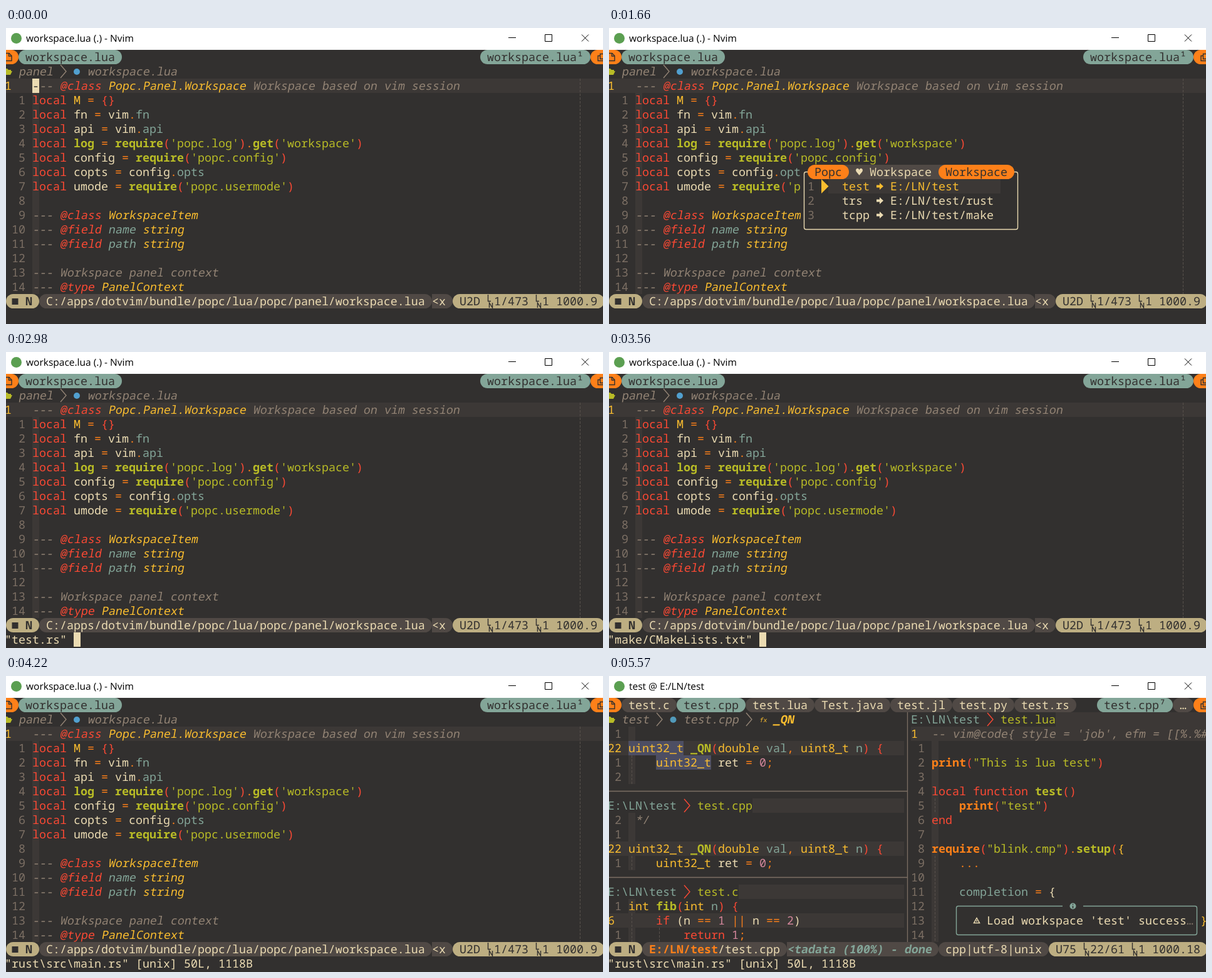
Recreate the animation shown at these times as an HTML page. Size 953 by 474 pixels, loop 5.8 s.

```html
<!DOCTYPE html>
<html lang="en">
<head>
<meta charset="utf-8">
<title>Editor session</title>
<style>
html, body { margin: 0; width: 100%; height: 100%; overflow: hidden; background: #32302f; }
svg { display: block; width: 953px; height: 474px; }
text { font: 18.333px "Noto Sans Mono", "DejaVu Sans Mono", monospace; white-space: pre; text-rendering: geometricPrecision; }
.title { font: 15.5px "Open Sans", "Noto Sans", sans-serif; fill: #000; }
.f { fill: #ebdbb2; }
.d, .D { fill: #32302f; }
.n { fill: #7c6f64; }
.r, .R { fill: #fb4934; }
.o, .O { fill: #fe8019; }
.y, .Y, .Q { fill: #fabd2f; }
.g, .G { fill: #b8bb26; }
.b, .B, .P { fill: #83a598; }
.p { fill: #d3869b; }
.c { fill: #928374; }
/* A gentle slant about the baseline, as the font has no italic */
.c, .R, .Y, .B, .P, .Q { transform: skewX(-10deg); transform-box: fill-box; transform-origin: 0 78.5%; }
.D, .O, .G, .P, .Q { font-weight: bold; }
</style>
</head>
<body>
<svg id="stage" viewBox="0 0 953 474" xmlns="http://www.w3.org/2000/svg"></svg>
<script>
const LOOP = 5800;
const BG = '#32302f', LINE = '#3c3836', GRAY = '#504945', FG = '#ebdbb2',
      TAN = '#bdae82', BLUE = '#83a598', ORANGE = '#fe8019', YELLOW = '#fabd2f';
const stage = document.getElementById('stage');
const layers = [];

// Character grid: 11 x 23 px cells
const X = col => col * 11 - 2;
const Y = row => 35 + row * 23;
const escapeText = s => s.replace(/&/g, '&amp;').replace(/</g, '&lt;');

const rect = (x, y, w, h, fill, rx = 0) =>
  `<rect x="${x}" y="${y}" width="${w}" height="${h}" rx="${rx}" fill="${fill}"/>`;
const stroke = (d, color, width = 1, extra = '') =>
  `<path d="${d}" fill="none" stroke="${color}" stroke-width="${width}" ${extra}/>`;
const dot = (x, y, r, fill) => `<circle cx="${x}" cy="${y}" r="${r}" fill="${fill}"/>`;
const cells = (col, row, w, h, fill) => rect(X(col), Y(row), w * 11, h * 23, fill);

// "~k" inside a string switches to text class k
function put(col, row, source) {
  let out = '', style = 'f';
  source.split(/~(\w)/).forEach((part, i) => {
    if (i % 2) { style = part; return; }
    if (part.trim()) out += `<text class="${style}" x="${X(col)}" y="${Y(row) + 18}">${escapeText(part)}</text>`;
    col += part.length;
  });
  return out;
}

const pillShape = (col, row, width, fill) => rect(X(col), Y(row), width * 11, 23, fill, 11.5);
const pill = (col, row, label, fill, style) =>
  pillShape(col, row, label.length + 2, fill) + put(col + 1, row, `~${style}${label}`);
const chevron = (col, row, color) =>
  stroke(`M${X(col) + 1} ${Y(row) + 1}l9 10.5l-9 10.5`, color, 1.4);
const block = (col, row, char = '') => cells(col, row, 1, 1, FG) + put(col, row, `~d${char}`);
const guide = (x, y1, y2) => stroke(`M${x} ${y1}V${y2}`, '#57504b', 1, 'stroke-dasharray="4 2"');
const lineMark = col =>
  stroke(`M${X(col) + 1.5} ${Y(17) + 1}v10.5h4.5m-2.5 10.5v-8l5 8v-8`, BG, 1.4);
const numbers = (col, row, from, to, width) => {
  let out = '';
  for (let n = from; n <= to; n++) out += put(col, row + n - from, '~n' + String(n).padStart(width));
  return out;
};

// Toggles are alternating show and hide times
function layer(markup, ...toggles) {
  const g = document.createElementNS('http://www.w3.org/2000/svg', 'g');
  g.innerHTML = markup;
  stage.append(g);
  layers.push({ g, toggles });
}

const windowFrame = () =>
  rect(0, 0, 953, 35, '#fff') + dot(16.5, 16.5, 8.5, '#5b9f51') +
  stroke('M802 15.5h12M860.5 10.5h11v11h-11zM919 10.5l11 11m0-11l-11 11', '#000') +
  rect(-14, 35, 34, 23, ORANGE, 11.5) +
  stroke('M-2 40.5h7l4 4v8h-11M4.5 40v5h5', BG, 1.4) +
  rect(933, 35, 34, 23, ORANGE, 11.5) +
  stroke('M948.5 41.5h8v8h-8zM948 44.5h-3v8h9v-3', BG, 1.4);

const folder = () => `<path d="M-2 65h4l2 2h4v2h2l-3 6h-9z" fill="#b8bb26"/>`;

const statusMode = () =>
  rect(0, Y(17), 53, 23, TAN, 11.5) + rect(9.5, 433, 10, 10, BG) + put(3, 17, '~DN');

const statusPosition = (col, undo, line, place) => {
  const second = col + 6 + line.length + 1;
  return rect(X(col), Y(17), 955 - X(col), 23, TAN, 11.5) +
    put(col + 1, 17, '~d' + undo) + lineMark(col + 5) +
    put(col + 6, 17, '~d' + line) + lineMark(second) + put(second + 1, 17, '~d' + place);
};

function singleView() {
  const code = [
    '~rlocal ~yM ~o= ~r{}',
    '~rlocal ~ffn ~o= ~fvim~o.~bfn',
    '~rlocal ~fapi ~o= ~fvim~o.~bapi',
    "~rlocal ~Glog ~o= ~Grequire~r(~g'popc.log'~r)~o.~Gget~r(~g'workspace'~r)",
    "~rlocal ~fconfig ~o= ~Grequire~r(~g'popc.config'~r)",
    '~rlocal ~fcopts ~o= ~fconfig~o.~bopts',
    "~rlocal ~fumode ~o= ~Grequire~r(~g'popc.usermode'~r)",
    '',
    '~c--- ~R@class ~YWorkspaceItem',
    '~c--- ~R@field ~Bname ~Ystring',
    '~c--- ~R@field ~Bpath ~Ystring',
    '',
    '~c--- Workspace panel context',
    '~c--- ~R@type ~YPanelContext'
  ];
  return rect(0, 0, 953, 474, BG) + windowFrame() +
    '<text class="title" x="32" y="22">workspace.lua (.) - Nvim</text>' +
    pill(2, 0, 'workspace.lua', BLUE, 'd') + pill(69, 0, 'workspace.lua¹', BLUE, 'd') +
    folder() + put(2, 1, '~cpanel') + chevron(8, 1, '#928374') +
    dot(113, 70, 5, '#51a0cf') + put(12, 1, '~cworkspace.lua') +
    cells(0, 2, 87, 1, LINE) + cells(4, 3, 1, 14, LINE) +
    guide(916.5, Y(2), Y(17)) +
    put(0, 2, '~y1   ~c--- ~R@class ~YPopc.Panel.Workspace ~cWorkspace based on vim session') +
    numbers(1, 3, 1, 14, 2) + code.map((s, i) => put(4, i + 3, s)).join('') +
    statusMode() +
    pill(5, 17, 'C:/apps/dotvim/bundle/popc/lua/popc/panel/workspace.lua', GRAY, 'f') +
    rect(680, Y(17), 20, 23, GRAY) + rect(690, Y(17), 23, 23, GRAY, 11.5) + put(62, 17, '<x') +
    statusPosition(65, 'U2D', '1/473', '1 1000.9');
}

function popup() {
  const items = [['test', ''], ['trs ', '/rust'], ['tcpp', '/make']];
  return rect(306, Y(8), 349, 105, BG) +
    `<rect x="311.5" y="230.5" width="341" height="92" rx="3" fill="none" stroke="${FG}" stroke-width="1.4"/>` +
    rect(372, Y(8), 165, 23, GRAY) +
    pill(29, 8, 'Popc', ORANGE, 'd') + put(36, 8, '♥') + put(38, 8, 'Workspace') +
    pill(48, 8, 'Workspace', ORANGE, 'd') +
    items.map((item, i) => put(29, 9 + i, `~n${i + 1}`) + popupItem(item, i, 'f', FG)).join('');
}

function popupItem([name, tail], i, style, color) {
  const y = Y(9 + i) + 11.5;
  return put(34, 9 + i, `~${style}${name}`) +
    `<path d="M427 ${y - 2}h5v-3.5l6 5.5l-6 5.5v-3.5h-5z" fill="${color}"/>` +
    put(41, 9 + i, `~${style}E:/LN/test${tail}`);
}

const selection = (item, i) =>
  rect(350, Y(9 + i), 275, 23, LINE) +
  `<path d="M339 ${Y(9 + i)}l11.5 11.5l-11.5 11.5z" fill="${YELLOW}"/>` +
  popupItem(item, i, 'y', YELLOW);

const pathBar = (col, row, file, right) => {
  const end = X(col + 13 + file.length);
  return put(col, row, String.raw`~bE:\LN\test`) + chevron(col + 11, row, '#fb4934') +
    put(col + 13, row, '~g' + file) + rect(end, Y(row), right - end, 23, LINE);
};

function splitView() {
  const signature = '~yuint32_t ~G_QN~r(~ydouble ~bval~o, ~yuint8_t ~bn~r) {';
  const body = '    ~yuint32_t ~fret ~o= ~p0~o;';
  const mark = '#4d4e63';
  const lua = ['', '~Oprint~r(~g"This is lua test"~r)', '', '~rlocal function ~Gtest~r()',
    '    ~Oprint~r(~g"test"~r)', '~rend', '',
    '~Orequire~r(~g"blink.cmp"~r)~o.~Gsetup~r(~y{', '    ~o...', '', '    ~bcompletion ~o= ~f{'];
  const inactive = [[2, 'test.c'], [20, 'test.lua'], [30, 'Test.java'], [41, 'test.jl'], [50, 'test.py'], [59, 'test.rs']];
  return rect(0, 0, 953, 474, BG) + windowFrame() +
    '<text class="title" x="32" y="22">test @ E:/LN/test</text>' +
    inactive.map(([col, name]) => pill(col, 0, name, GRAY, 'f')).join('') +
    pill(10, 0, 'test.cpp', BLUE, 'd') + pill(71, 0, 'test.cpp⁷', BLUE, 'd') + pill(82, 0, '…', GRAY, 'f') +
    folder() +
    [3, 10, 15].map(row => rect(0, Y(row), 471, 23, LINE)).join('') +
    cells(44, 2, 43, 1, LINE) +
    [[3, 2, 4], [3, 8, 4], [3, 14, 3], [47, 3, 14]].map(([c, r, h]) => cells(c, r, 1, h, LINE)).join('') +
    cells(3, 3, 8, 1, mark) + cells(7, 4, 8, 1, mark) +
    guide(36.5, Y(4), Y(6)) + guide(36.5, Y(11), Y(12)) + guide(36.5, Y(15), Y(17)) +
    guide(80.5, Y(16), Y(17)) + guide(520.5, Y(7), Y(8)) + guide(520.5, Y(11), Y(17)) +
    stroke('M476.5 58V426M0 184.5H476M0 322.5H476', '#7c6f64', 1.3) +
    numbers(0, 2, 1, 1, 2) + put(0, 3, '~y22 ' + signature) + numbers(0, 4, 1, 2, 2) + put(3, 4, body) +
    pathBar(0, 7, 'test.cpp', 471) + put(0, 8, '~n 2 ~c */') + numbers(0, 9, 1, 1, 2) +
    put(0, 10, '~y22 ' + signature) + put(0, 11, '~n 1 ' + body) +
    pathBar(0, 13, 'test.c', 471) + put(0, 14, '~n 1 ~yint ~Gfib~r(~yint ~bn~r) {') +
    put(0, 15, '~y6  ~r    if ~f(n ~o== ~p1 ~o|| ~fn ~o== ~p2~f)') +
    put(0, 16, '~n 1 ~r        return ~p1~o;') +
    pathBar(44, 1, 'test.lua', 953) +
    put(44, 2, "~y1  ~c-- vim@code{ style = 'job', efm = [[%.%#") +
    numbers(44, 3, 1, 14, 2) + lua.map((s, i) => put(47, i + 3, s)).join('') + put(86, 15, '~y}') +
    statusMode() + pillShape(5, 17, 21, GRAY) + put(6, 17, '~OE:/LN/test~f/test.cpp') +
    rect(284, Y(17), 225, 23, GRAY) + rect(490, Y(17), 36, 23, GRAY, 11.5) +
    pill(48, 17, 'cpp|utf-8|unix', GRAY, 'f') +
    statusPosition(64, 'U75', '22/61', '1 1000.18');
}

const notice = () =>
  rect(549, Y(14), 395, 69, BG) +
  stroke('M724 368.5H557.5q-3 0-3 3V411.5q0 3 3 3H935.5q3 0 3-3V371.5q0-3-3-3H757', BLUE, 1.4) +
  dot(740.5, 368.5, 5, BLUE) + stroke('M740.5 365v1.5m0 1.5v4', BG, 1.5) +
  stroke('M587 387.5l4.5 8h-9zM587 391v2.5', FG, 1.5) +
  put(55, 15, "Load workspace 'test' success~n…");

const commandLine = (name, ext = '') => {
  const s = `"${name}"${ext}`;
  return cells(0, 18, 60, 1, BG) + put(0, 18, s) + (ext ? '' : block(s.length + 1, 18));
};

layer(singleView(), 0, 4290);
layer(block(4, 2, '-'), 0, 160);
layer(put(76, 18, '<20>'), 260, 590);
layer(put(80, 18, '<20>'), 460, 590);
layer(popup(), 590, 2250);
layer(selection(['test', ''], 0), 590, 1230, 1660, 2250);
layer(selection(['trs ', '/rust'], 1), 1230, 1660);
layer(splitView(), 4290, LOOP);
layer(notice(), 4360, LOOP);

const opened = [
  [2250, 'test.c'], [2370, 'test.cpp'], [2670, 'test.lua'], [2710, 'Test.java'], [2750, 'test.jl'],
  [2800, 'test.py'], [2980, 'test.rs'], [3180, 'test.vim'], [3230, 'test.sh'], [3280, 'test.tex'],
  [3560, 'make/CMakeLists.txt'], [3660, 'make/main.cpp'], [3710, 'make/util.cpp'], [3770, 'make/util.h'],
  [3830, 'rust\\Cargo.toml'], [3880, 'rust\\build.rs'], [4040, 'rust\\src\\lib.rs'], [4140, 'rust\\src\\main.rs'], [4220]
];
opened.slice(0, -1).forEach(([time, name], i) => layer(commandLine(name), time, opened[i + 1][0]));
layer(commandLine('rust\\src\\main.rs', ' [unix] 50L, 1118B'), 4220, LOOP);

const progress = [
  [4560, '<analyzer] ⣟ Fetching'], [4710, '< ⣷ Fetching metadata'],
  [5420, '<tching metadata 100%'], [5500, '<tadata (100%) - done'], [LOOP]
];
progress.slice(0, -1).forEach(([time, s], i) => layer(put(26, 17, '~P' + s), time, progress[i + 1][0]));

layer(put(2, 1, '~csrc') + chevron(6, 1, '#928374') + dot(91.5, 70, 5, '#a89984') + put(10, 1, '~cmain.rs'), 4290, 5500);
layer(put(2, 1, '~ctest') + chevron(7, 1, '#928374') + dot(102.5, 70, 5, '#519aba') + put(11, 1, '~ctest.cpp') +
  chevron(20, 1, '#928374') + '<text class="Y" x="240" y="74" style="font-size:10px">fx</text>' + put(24, 1, '~Q_QN'), 5500, LOOP);
layer(block(3, 3, 'u'), 4290, 4710, 5190, 5570);

function draw(now) {
  const t = now % LOOP;
  for (const { g, toggles } of layers) {
    const visible = toggles.filter(time => time <= t).length % 2;
    g.style.display = visible ? '' : 'none';
  }
}

const start = performance.now();
function tick() {
  draw(performance.now() - start);
  requestAnimationFrame(tick);
}
tick();
</script>
</body>
</html>
```
